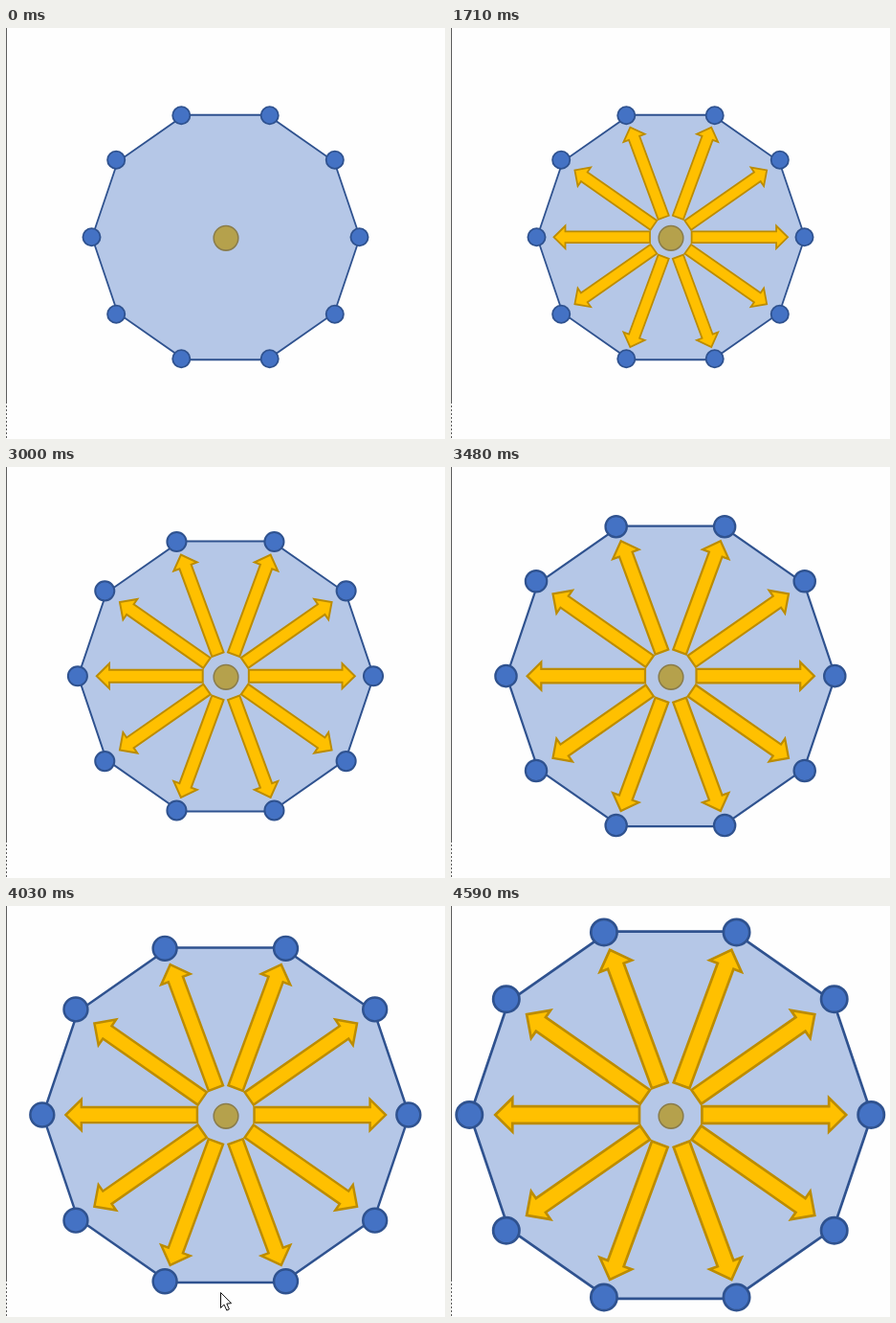
Animation, 459 px wide and 429 px high, one loop 5.25 s. Source, as an HTML page with a canvas:

```html
<!DOCTYPE html>
<html lang="en">
<head>
<meta charset="utf-8">
<title>Expanding decagon</title>
<style>
html, body { margin: 0; width: 100%; height: 100%; overflow: hidden; background: #fefefe; }
canvas { display: block; }
</style>
</head>
<body>
<canvas id="stage" width="459" height="429"></canvas>
<script>
const ctx = document.getElementById('stage').getContext('2d');
const LOOP = 5250;
const RADIUS = 140;

// The picture only changes on ticks: [from, interval] in ms
const TICKS = [[0, LOOP], [1280, 140], [2620, 140], [2760, 120], [3600, 141]];

// One quadrant of the dot ring, mirrored for the rest
const QUADRANT = [[RADIUS, 0], [114.3, 80.5], [46.2, 127]];
const ARROW_TURN = 34.85 * Math.PI / 180;

const clamp01 = v => Math.min(1, Math.max(0, v));
const progress = (t, start, duration) => clamp01((t - start) / duration);

function snap(t) {
  const [from, interval] = TICKS.findLast(([start]) => start <= t);
  return from + Math.floor((t - from) / interval) * interval;
}

function paint(fill, stroke, width) {
  ctx.fillStyle = fill;
  ctx.strokeStyle = stroke;
  ctx.lineWidth = width;
  ctx.fill();
  ctx.stroke();
}

function polygon(points) {
  ctx.beginPath();
  points.forEach(([x, y]) => ctx.lineTo(x, y));
  ctx.closePath();
}

function circle(x, y, r) {
  ctx.beginPath();
  ctx.arc(x, y, r, 0, Math.PI * 2);
}

function at(x, y, scale, draw) {
  ctx.save();
  ctx.translate(x, y);
  ctx.scale(scale, scale);
  draw();
  ctx.restore();
}

function drawDecagon() {
  const corners = Array.from({ length: 10 }, (_, i) => {
    const a = i * Math.PI / 5;
    return [RADIUS * Math.cos(a), 134.3 * Math.sin(a) - 0.5];
  });
  polygon(corners);
  paint('#b5c7e7', '#2f528f', 1.8);
  for (const [x, y] of QUADRANT) {
    for (const sx of [-1, 1]) {
      for (const sy of y ? [-1, 1] : [1]) {
        circle(sx * x - 0.5, sy * y - 0.7, 9.1);
        paint('#4472c4', '#2f528f', 1.8);
      }
    }
  }
}

function drawArrow(angle) {
  const base = 21.8, tip = 122.3, neck = tip - 12;
  ctx.save();
  ctx.translate(-0.2, -0.7);
  ctx.rotate(angle);
  polygon([[base, -5.9], [neck, -5.9], [neck, -11.8], [tip, 0],
           [neck, 11.8], [neck, 5.9], [base, 5.9]]);
  paint('#ffc000', '#bc8c00', 1.8);
  ctx.restore();
}

function drawArrows() {
  for (let k = -2; k <= 2; k++) {
    drawArrow(k * ARROW_TURN);
    drawArrow(Math.PI + k * ARROW_TURN);
  }
}

function drawEdge() {
  ctx.fillStyle = '#5c5c5c';
  ctx.fillRect(0, 0, 1, 390);
  for (let y = 390; y < 429; y += 4) ctx.fillRect(0, y, 1, 2);
}

function drawCursor() {
  polygon([[0, 0], [0, 16], [3.6, 12.6], [6.3, 18.6], [8.9, 17.4], [6.3, 11.6], [11, 11.2]]);
  paint('#fff', '#111', 1);
}

function render(time) {
  const t = snap(time);
  const grow = progress(t, 1170, 500) * (t >= 1280);
  const size = 1 + 0.5 * progress(t, 2597, 1938);

  ctx.fillStyle = '#fefefe';
  ctx.fillRect(0, 0, 459, 429);
  drawEdge();
  at(230, 219, size, drawDecagon);
  circle(230, 219.3, 12.8);
  paint('#b5a14c', '#8a7d4c', 1.6);
  ctx.globalAlpha = grow;
  at(230, 219, size * grow, drawArrows);
  ctx.globalAlpha = 1;
  if (t > 4000 && t < 4100) at(224.5, 403.5, 1, drawCursor);
}

const begin = performance.now();
function tick() {
  render((performance.now() - begin) % LOOP);
  requestAnimationFrame(tick);
}
tick();
</script>
</body>
</html>
```
